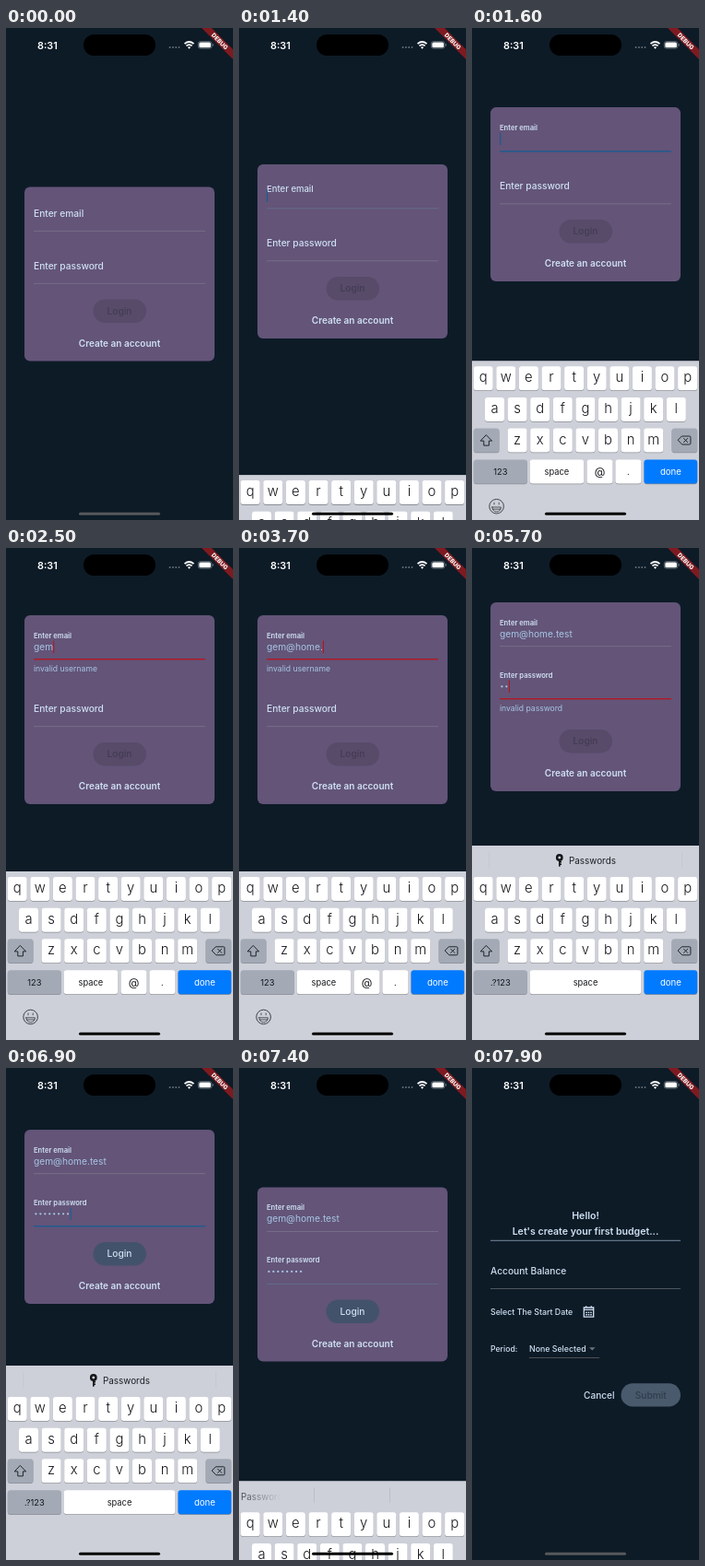
Write an HTML page that moves like this. It is 246 px wide and 534 px high and loops after 8 s.

```html
<!DOCTYPE html>
<html lang="en">
<head>
<meta charset="utf-8">
<title>Login form</title>
<style>
html, body { margin: 0; width: 100%; height: 100%; overflow: hidden; background: #0d1b27; }
svg { display: block; width: 100vw; height: 100vh; }
text { font-family: Inter, Roboto, sans-serif; white-space: pre; }
</style>
</head>
<body>
<svg id="stage" viewBox="0 0 246 534">
  <defs>
    <linearGradient id="reveal" gradientUnits="userSpaceOnUse" x1="0" x2="1" y1="0" y2="0">
      <stop stop-color="#1c1f24"/><stop offset="1" stop-color="#1c1f24" stop-opacity="0"/>
    </linearGradient>
    <linearGradient id="fadeOut" gradientUnits="userSpaceOnUse" x1="0" x2="46" y1="0" y2="0">
      <stop stop-color="#1c1f24" stop-opacity=".8"/><stop offset="1" stop-color="#1c1f24" stop-opacity="0"/>
    </linearGradient>
  </defs>
</svg>
<script>
const LOOP = 8000;
const T = { email: 1345, typeEmail: 2050, emailOk: 4250, password: 4745, typePass: 5450, passOk: 6200, done: 7290, page: 7800 };
const EMAIL = 'gem@home.test', EMAIL_STEP = 200;
const PASS_LENGTH = 8, PASS_STEP = 150;
const LIGHT = '#cfe0f2', SOFT = '#a6c5e3', IDLE = [126, 121, 139], BLUE = [22, 92, 148], RED = [184, 20, 28];

const stage = document.getElementById('stage');

function add(parent, tag, attrs = {}) {
  const node = document.createElementNS('http://www.w3.org/2000/svg', tag);
  set(node, attrs);
  parent.appendChild(node);
  return node;
}
function set(node, attrs) {
  for (const key in attrs) node.setAttribute(key, attrs[key]);
}
const group = parent => add(parent, 'g');
const rect = (p, x, y, width, height, rx, fill) => add(p, 'rect', { x, y, width, height, rx, fill });
const path = (p, d, attrs) => add(p, 'path', { d, fill: 'none', ...attrs });
// y is the middle of the capital letters
function text(p, str, x, y, size, fill = LIGHT, weight = 500, anchor = 'start') {
  const node = add(p, 'text', { x, y: y + size * 0.36, 'font-size': size, fill, 'font-weight': weight, 'text-anchor': anchor });
  node.textContent = str;
  return node;
}
const show = (node, on) => node.setAttribute('visibility', on ? 'visible' : 'hidden');
const move = (node, y) => node.setAttribute('transform', `translate(0 ${y.toFixed(2)})`);

const clamp = k => Math.max(0, Math.min(1, k));
const smooth = k => k * k * (3 - 2 * k);
const ramp = (t, start, length = 167) => smooth(clamp((t - start) / length));
const lerp = (a, b, k) => a + (b - a) * k;
function spring(ms) {
  const w = Math.max(0, ms) * 0.018;
  return 1 - (1 + w) * Math.exp(-w);
}
function blend(t, start, steps) {
  let value = start;
  for (const [at, next] of steps) value = value.map((v, i) => lerp(v, next[i], ramp(t, at)));
  return value;
}
const rgb = c => `rgb(${c.map(Math.round)})`;

// Login card, drawn from its own top edge
const login = group(stage);
const card = rect(login, 20, 0, 206, 189, 6, '#635478');

function makeField(label, error, top) {
  const g = group(login);
  const line = rect(g, 30, 47, 186, 0.7, 0, rgb(IDLE));
  const title = text(g, label, 0, 0, 10.2);
  const warning = text(g, error, 30, 58, 8.6, SOFT, 400);
  const cursor = rect(g, 30, 27.5, 1.1, 13.5, 0.5, rgb(BLUE));
  return { g, line, title, warning, cursor, top };
}
const email = makeField('Enter email', 'invalid username', 0);
const password = makeField('Enter password', 'invalid password', 57);
const emailText = text(email.g, '', 30, 34, 10.2, SOFT, 400);
const dots = Array.from({ length: PASS_LENGTH }, (_, i) =>
  add(password.g, 'circle', { cx: 32.4 + i * 4.95, cy: 34.3, r: 1.15, fill: SOFT }));

const actions = group(login);
const button = rect(actions, 94.5, 122, 57.5, 25.5, 12.75, '');
const buttonText = text(actions, 'Login', 123, 134.7, 10.2, LIGHT, 500, 'middle');
text(actions, 'Create an account', 123, 169.7, 10, LIGHT, 600, 'middle');

function drawField(f, t, shift, o) {
  move(f.g, f.top + shift);
  const up = ramp(t, o.focus);
  const focused = up - ramp(t, o.blur);
  set(f.title, { transform: `translate(30 ${lerp(32.3, 24.8, up)}) scale(${lerp(1, 0.75, up)})`, y: 0 });
  f.title.setAttribute('font-weight', up > 0.5 ? 600 : 500);
  const color = rgb(blend(t, IDLE, [[o.focus, BLUE], [o.type, RED], [o.ok, BLUE], [o.blur, IDLE]]));
  set(f.line, { fill: color, height: lerp(0.7, 1.3, focused), y: 47.4 - 0.3 * focused });
  const alpha = ramp(t, o.type) - ramp(t, o.ok);
  set(f.warning, { opacity: alpha, transform: `translate(0 ${(alpha - 1) * 2})` });
  const blinkOn = Math.floor((t - o.lastKey) / 500) % 2 === 0;
  show(f.cursor, t >= o.focus && t < o.blur && blinkOn);
  set(f.cursor, { x: o.cursorX, fill: t >= o.type && t < o.ok ? rgb(RED) : rgb(BLUE) });
}
const errorSpace = (t, from, to) => t >= from && t < to + 167 ? 16 : 0;

function drawLogin(t, screenBottom) {
  const gap1 = errorSpace(t, T.typeEmail, T.emailOk);
  const gap2 = errorSpace(t, T.typePass, T.passOk);
  const height = 189 + gap1 + gap2;
  move(login, screenBottom / 2 - height / 2);
  card.setAttribute('height', height);

  const letters = Math.max(0, Math.min(EMAIL.length, Math.floor((t - T.typeEmail) / EMAIL_STEP) + 1));
  emailText.textContent = EMAIL.slice(0, letters);
  drawField(email, t, 0, {
    focus: T.email, type: T.typeEmail, ok: T.emailOk, blur: T.password,
    lastKey: letters ? T.typeEmail + (letters - 1) * EMAIL_STEP : T.email,
    cursorX: 30 + (letters ? emailText.getComputedTextLength() : 0)
  });

  const count = Math.max(0, Math.min(PASS_LENGTH, Math.floor((t - T.typePass) / PASS_STEP) + 1));
  dots.forEach((dot, i) => show(dot, i < count));
  drawField(password, t, gap1, {
    focus: T.password, type: T.typePass, ok: T.passOk, blur: T.done,
    lastKey: count ? T.typePass + (count - 1) * PASS_STEP : T.password,
    cursorX: 30 + count * 4.95
  });

  move(actions, gap1 + gap2);
  const on = ramp(t, T.passOk, 200);
  button.setAttribute('fill', rgb(blend(on, [87, 75, 105], []).map((v, i) => lerp(v, [67, 82, 107][i], on))));
  buttonText.setAttribute('fill', rgb([68, 59, 84].map((v, i) => lerp(v, [207, 224, 242][i], on))));
}

// Next page
const budget = group(stage);
text(budget, 'Hello!', 123, 160, 10.6, LIGHT, 600, 'middle');
text(budget, "Let's create your first budget...", 123, 176.7, 10.6, LIGHT, 600, 'middle');
rect(budget, 20, 186.8, 206, 0.9, 0, '#8497ad');
text(budget, 'Account Balance', 20, 220.7, 10.2);
rect(budget, 20, 239.1, 206, 0.7, 0, '#687078');
text(budget, 'Select The Start Date', 20, 264.7, 8.8);
path(budget, 'M121.3 260h10.4v10.2h-10.4zM121.3 262.4h10.4M123.7 258.2v2M129.3 258.2v2', { stroke: LIGHT, 'stroke-width': 1.3 });
for (let i = 0; i < 6; i++) rect(budget, 123.2 + (i % 3) * 2.5, 264.6 + Math.floor(i / 3) * 2.4, 1.6, 1.5, 0, LIGHT);
text(budget, 'Period:', 20, 304.7, 8.7);
text(budget, 'None Selected', 62, 304.7, 8.8);
path(budget, 'M127 303.3h6.6l-3.3 3.3z', { fill: '#6c737b' });
rect(budget, 62, 314.1, 76, 0.7, 0, '#6b6865');
text(budget, 'Cancel', 121, 355, 10.1);
rect(budget, 161.5, 342.3, 64.5, 25.2, 12.6, '#495a6c');
text(budget, 'Submit', 193.8, 355, 10.2, '#2f3e4d', 500, 'middle');

// Keyboard, drawn where it rests when open
const keyboard = group(stage);
const plate = rect(keyboard, 0, 351, 246, 420, 0, '#cdd0d8');
const INK = '#15171a', WHITE = '#ffffff', GRAY = '#a3aab6';
function key(p, x, y, width, label = '', size = 9.3, fill = WHITE, ink = INK, weight = 400) {
  rect(p, x, y + 0.8, width, 26, 3, '#8b8e95');
  rect(p, x, y, width, 26, 3, fill);
  text(p, label, x + width / 2, y + (size > 12 ? 11.8 : 13), size, ink, weight, 'middle');
}
[['qwertyuiop', 1.7, 357], ['asdfghjkl', 14, 390.7], ['zxcvbnm', 38.6, 424.3]].forEach(([row, x, y]) =>
  [...row].forEach((c, i) => key(keyboard, x + i * 24.6, y, 21, c, 14.8, WHITE, INK, 300)));
key(keyboard, 1.8, 424.3, 27.7, '', 9, GRAY);
key(keyboard, 216.5, 424.3, 27.7, '', 9, GRAY);
const stroke = { stroke: INK, 'stroke-width': 0.9, 'stroke-linejoin': 'round', 'stroke-linecap': 'round' };
path(keyboard, 'M15.6 431.7l6 6.2h-3.2v5h-5.6v-5h-3.2z', stroke);
path(keyboard, 'M227.7 432.8h8q1.2 0 1.2 1.2v6.6q0 1.2-1.2 1.2h-8l-4.3-4.5zM229.5 435.2l4.2 4.2m0-4.2l-4.2 4.2', stroke);
key(keyboard, 186.5, 458.2, 57.7, 'done', 9.6, '#007aff', WHITE);

const mailKeys = group(keyboard);
key(mailKeys, 1.8, 458.2, 58, '123', 9.3, GRAY);
key(mailKeys, 62.7, 458.2, 58.5, 'space');
key(mailKeys, 124.5, 458.2, 28, '@', 12);
key(mailKeys, 155.4, 458.2, 28, '.');
add(mailKeys, 'circle', { cx: 26.6, cy: 509, r: 7.8, fill: 'none', stroke: '#40444b', 'stroke-width': 1 });
path(mailKeys, 'M21.8 509.8h9.6q-.6 5-4.8 5t-4.8-5zM22.3 512h8.6M24 505v1.8M29.2 505v1.8', { ...stroke, stroke: '#40444b' });

const passKeys = group(keyboard);
key(passKeys, 1.8, 458.2, 58, '.?123', 9.3, GRAY);
key(passKeys, 62.7, 458.2, 120.6, 'space');

const suggestion = group(keyboard);
for (const x of [18.5, 227]) rect(suggestion, x, 330, 0.6, 17, 0, '#c0c4cc');
add(suggestion, 'circle', { cx: 94.8, cy: 336, r: 2.7, fill: 'none', stroke: INK, 'stroke-width': 2.4 });
path(suggestion, 'M94.8 338.5v7.2M95 343.2h2M95 340.8h2', { stroke: INK, 'stroke-width': 1.6 });
text(suggestion, 'Passwords', 105, 339.5, 9.9, 'url(#reveal)', 400);

const closingBar = group(keyboard);
for (const x of [81, 163]) rect(closingBar, x, 330, 0.7, 17, 0, '#b3b8c1');
text(closingBar, 'Passwords', 2, 340, 9.9, 'url(#fadeOut)', 400);

const reveal = document.getElementById('reveal');

function keyboardTop(t) {
  if (t < T.password) return 534 - 183 * spring(t - T.email);
  return 323 + 211 * spring(t - T.done);
}
function drawKeyboard(t, top) {
  const forPassword = t >= T.password;
  const rest = forPassword ? 323 : 351;
  move(keyboard, top - rest);
  plate.setAttribute('y', rest);
  mailKeys.style.display = forPassword ? 'none' : '';
  passKeys.style.display = forPassword ? '' : 'none';
  suggestion.style.display = forPassword && t < T.done ? '' : 'none';
  closingBar.style.display = t >= T.done ? '' : 'none';
  const edge = 100 + 85 * clamp((t - T.password - 15) / 200);
  set(reveal, { x1: edge - 22, x2: edge });
}

// Status bar, debug ribbon and home indicator
const chrome = group(stage);
text(chrome, '8:31', 34, 18.8, 10.8, WHITE, 600);
rect(chrome, 84, 7, 78, 23, 11.5, '#000');
for (let i = 0; i < 4; i++) add(chrome, 'circle', { cx: 177.6 + i * 3.3, cy: 21, r: 0.95, fill: '#68727b' });
path(chrome, 'M193.5 17.2q5-4.4 10 0M195.4 19.4q3.1-2.7 6.2 0', { stroke: WHITE, 'stroke-width': 1.7 });
path(chrome, 'M196.9 20.9q1.6-1.3 3.2 0l-1.6 1.8z', { fill: WHITE });
add(chrome, 'rect', { x: 208.3, y: 14.6, width: 14.6, height: 7.6, rx: 2.3, fill: 'none', stroke: '#76808a', 'stroke-width': 0.7 });
rect(chrome, 209.3, 15.6, 12.6, 5.6, 1.5, WHITE);
rect(chrome, 223.7, 17.1, 0.9, 2.6, 0.5, '#76808a');
const ribbon = add(chrome, 'g', { transform: 'translate(246 0) rotate(45)' });
rect(ribbon, -25, 16.4, 50, 7.6, 0, '#7f1b20');
text(ribbon, 'DEBUG', 0, 20.3, 6.4, WHITE, 800, 'middle');
const home = rect(chrome, 79, 525.8, 88, 3, 1.5, '#000');

function draw(now) {
  const t = now % LOOP;
  const onPage = t >= T.page;
  const top = keyboardTop(t);
  login.style.display = onPage ? 'none' : '';
  budget.style.display = onPage ? '' : 'none';
  const open = t > T.email && !onPage;
  keyboard.style.display = open ? '' : 'none';
  if (!onPage) drawLogin(t, top);
  drawKeyboard(t, top);
  home.setAttribute('fill', open && top < 527 ? '#000' : '#56585b');
}
const start = performance.now();
function tick() {
  draw(performance.now() - start);
  requestAnimationFrame(tick);
}
tick();
</script>
</body>
</html>
```
